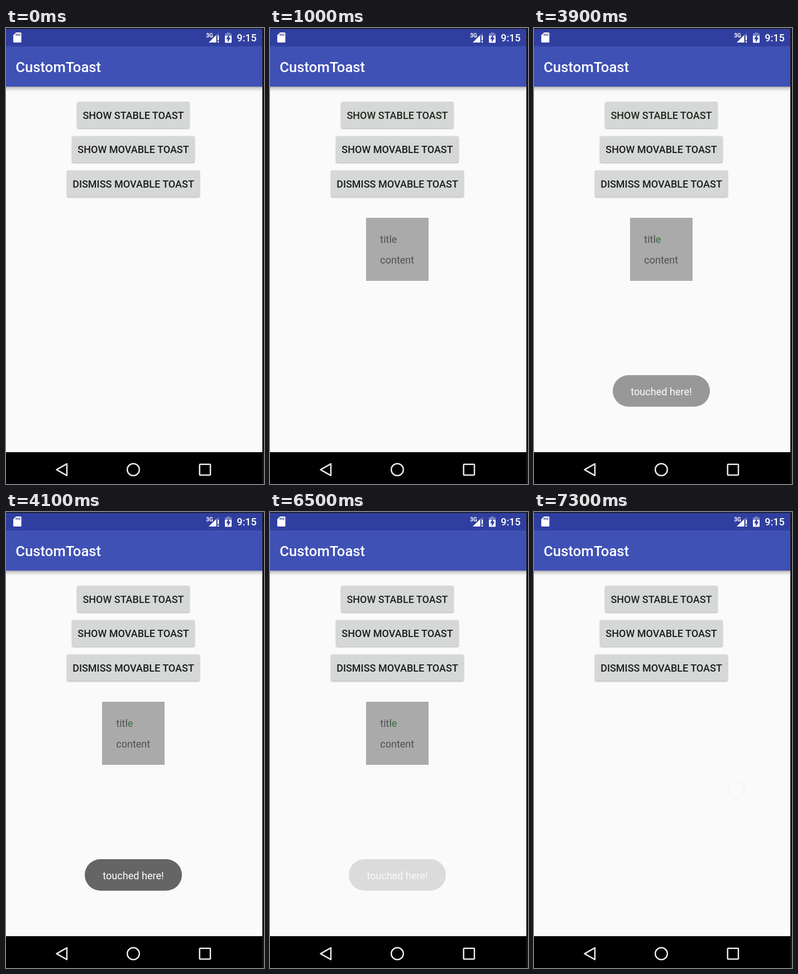
Write an HTML page that moves like this. It is 462 px wide and 817 px high and loops after 8000 ms.

```html
<!DOCTYPE html>
<html lang="en">
<head>
<meta charset="utf-8">
<title>Toast demo</title>
<style>
  html, body { margin: 0; width: 100%; height: 100%; overflow: hidden; background: #fafafa; }
  svg { display: block; width: 462px; height: 817px; font: 18px Roboto, sans-serif; }
  .medium { font-weight: 500; }
  .button rect { fill: #d6d7d7; filter: drop-shadow(0 1px 1px rgba(0, 0, 0, .32)); }
  .button text { fill: #1c1d1d; font-weight: 500; text-anchor: middle; }
  .nav { fill: none; stroke: #e9e9e9; stroke-width: 2.5; stroke-linejoin: round; }
</style>
</head>
<body>
<svg viewBox="0 0 462 817">
  <defs>
    <linearGradient id="shade" x2="0" y2="1">
      <stop stop-color="#000" stop-opacity=".32"/>
      <stop offset=".4" stop-color="#000" stop-opacity=".13"/>
      <stop offset="1" stop-color="#000" stop-opacity="0"/>
    </linearGradient>
    <radialGradient id="touch">
      <stop stop-color="#d8d8d8"/>
      <stop offset=".74" stop-color="#e5e5e5"/>
      <stop offset=".8" stop-color="#e0e0e4"/>
      <stop offset=".86" stop-color="#9291a4"/>
      <stop offset="1" stop-color="#9a99aa" stop-opacity="0"/>
    </radialGradient>
    <clipPath id="tintArea"><path d="M216 365h20v25h-20z"/></clipPath>
  </defs>

  <rect width="462" height="817" fill="#fafafa"/>
  <rect y="105" width="459" height="9" fill="url(#shade)"/>
  <rect y="33" width="459" height="72" fill="#3f51b5"/>
  <rect width="459" height="33" fill="#303f9f"/>
  <text class="medium" x="17.3" y="78.5" font-size="25.7" fill="#fff">CustomToast</text>

  <g fill="#fff">
    <path d="M18 8h8q1.5 0 1.5 1.5v15q0 1.5-1.5 1.5H14.500q-1.500 0-1.500-1.500V13z"/>
    <path d="M18.300 10v4M21.400 10v4M24.500 10v4" stroke="#303f9f" stroke-width="1.500"/>
    <text x="358.300" y="16.500" font-size="10" font-weight="700">3G</text>
    <path d="M381 9v5h-5v12h-13z" opacity=".3"/>
    <path d="M363 26 376.500 12.500V26zM378.800 14h2.400v8h-2.400zM378.800 23.600h2.400V26h-2.400z"/>
    <path d="M395.500 8h5v2h3.500v5h-12v-5h3.500z" opacity=".35"/>
    <path d="M392 14h12v11.500q0 1-1 1h-10q-1 0-1-1z"/>
    <path d="M399.500 11.500v6h3l-5.500 8v-5.500h-3z" fill="#303f9f"/>
    <text class="medium" x="413.300" y="24">9:15</text>
  </g>

  <g class="button">
    <rect x="127.500" y="132" width="201" height="47.500" rx="2.500"/>
    <rect id="ripple" x="127.500" y="132" width="201" height="47.500" rx="2.500" style="fill:#a9aaaa;filter:none"/>
    <text id="stable" x="228" y="163">SHOW STABLE TOAST</text>
  </g>
  <g class="button">
    <rect x="118.300" y="193.700" width="219.400" height="47.200" rx="2.500"/>
    <text x="228" y="224.300">SHOW MOVABLE TOAST</text>
  </g>
  <g class="button">
    <rect x="109.200" y="255.300" width="237.600" height="47.200" rx="2.500"/>
    <text x="228" y="286">DISMISS MOVABLE TOAST</text>
  </g>

  <g id="popup" fill="#505050">
    <rect x="172" y="340" width="112" height="113" fill="#aaa"/>
    <text x="197.300" y="385">title</text>
    <text id="tint" x="197.300" y="385" fill="#4b804d" clip-path="url(#tintArea)">title</text>
    <text x="197.300" y="422">content</text>
  </g>

  <g id="toast">
    <rect x="141" y="622" width="174" height="56.500" rx="28.250" fill="#656565"/>
    <text x="228" y="657.500" font-size="18.100" fill="#fff" text-anchor="middle">touched here!</text>
  </g>

  <circle id="cursor" r="17" fill="url(#touch)"/>
  <circle id="ghost" cx="362.700" cy="496.700" r="14.300" fill="#fbfbfb" stroke="#f4f4f4" stroke-width="2"/>

  <rect y="760" width="459" height="57"/>
  <g class="nav">
    <path d="M90.500 791.300 109 780.800v21z"/>
    <circle cx="228" cy="791.300" r="10.800"/>
    <rect x="346.700" y="781.700" width="19.300" height="19.300" rx="1"/>
  </g>
  <path d="M0 0H462V817H459V1.500H0z" fill="#17171a"/>
</svg>

<script>
const LOOP = 8000, STEP = 100;
const el = id => document.getElementById(id);
const show = (id, opacity) => el(id).setAttribute('opacity', opacity);

// Linear interpolation through [time, value] points, held at both ends.
function track(t, ...points) {
  let [t0, v0] = points[0];
  for (const [t1, v1] of points) {
    if (t < t1) return t <= t0 ? v0 : v0 + (v1 - v0) * (t - t0) / (t1 - t0);
    [t0, v0] = [t1, v1];
  }
  return v0;
}

const taps = [
  { at: 300, x: 231, y: 148, hold: 200 },
  { at: 3600, x: 233.5, y: 390.5, hold: 100 },
  { at: 7100, x: 362.7, y: 496.7, hold: 100 }
];

function draw(t) {
  show('ripple', track(t, [200, 0], [400, .5], [500, .4], [700, 0]));
  el('stable').style.fill = t >= 700 ? '#1e271e' : '';
  show('popup', track(t, [400, 0], [600, .9], [700, 1], [7100, 1], [7300, 0]));
  show('tint', t >= 3900 ? 1 : 0);
  show('toast', track(t, [3700, 0], [3800, .25], [3900, .65], [4000, .9], [4100, 1],
                         [6200, 1], [6300, .85], [6400, .5], [6500, .2], [6600, 0]));

  const tap = taps.findLast(({ at }) => t >= at) || taps[0];
  const cursor = el('cursor');
  cursor.setAttribute('cx', tap.x);
  cursor.setAttribute('cy', tap.y);
  const release = tap.at + tap.hold;
  show('cursor', t < tap.at ? 0 : track(t, [release, 1], [release + 100, 0]));
  show('ghost', t >= 7300 ? 1 : 0);
}

const start = performance.now();
function tick() {
  const t = (performance.now() - start) % LOOP;
  draw(Math.floor(t / STEP) * STEP);
  requestAnimationFrame(tick);
}
tick();
</script>
</body>
</html>
```
